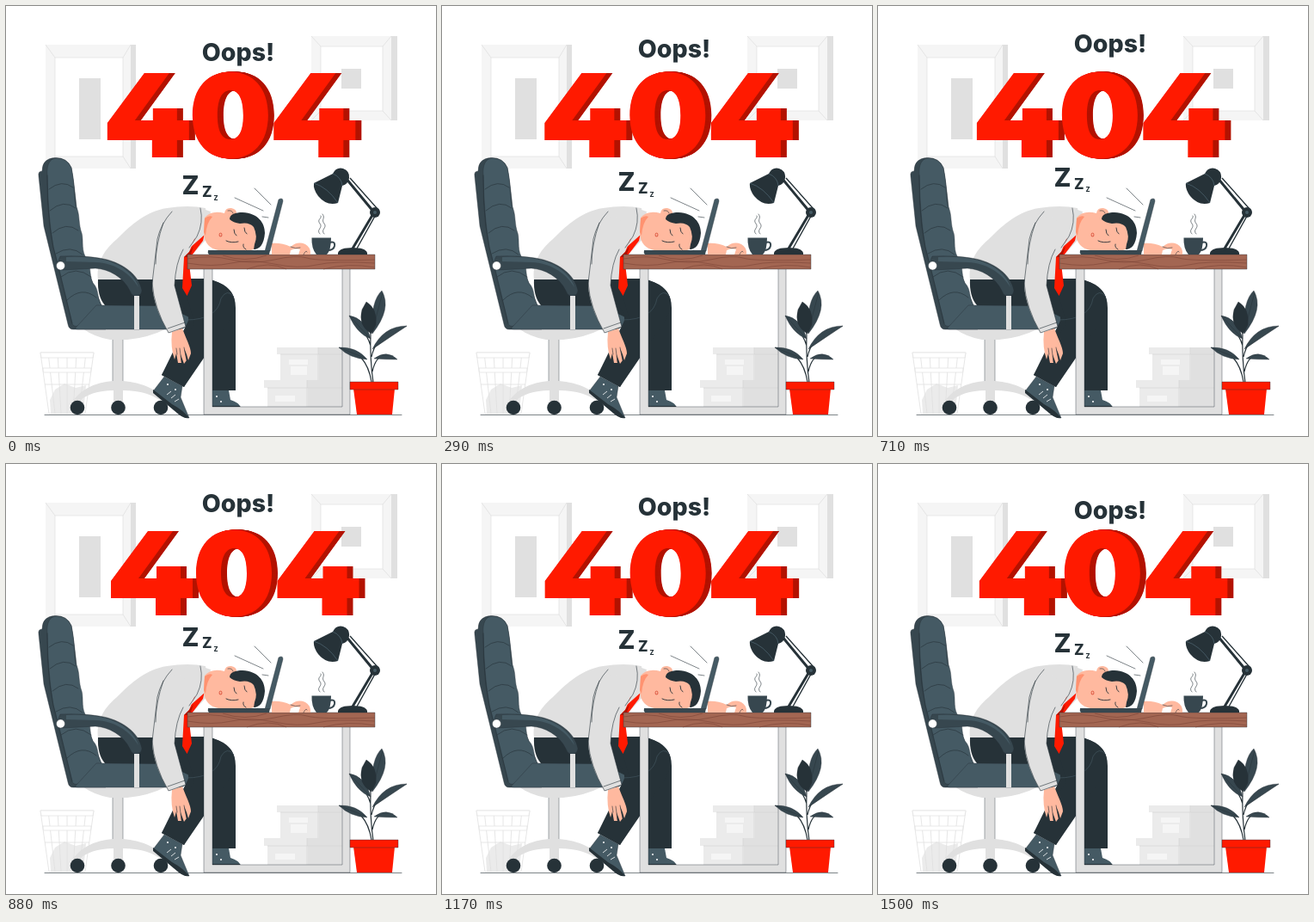
An HTML page for the animation above (1540 ms loop, 500 px wide and 500 px high).

```html
<!DOCTYPE html>
<html lang="en">
<head>
<meta charset="utf-8">
<title>404</title>
<style>
  html, body { margin: 0; width: 100%; height: 100%; overflow: hidden; background: #fff; }
  svg { display: block; width: 100vw; height: 100vh; }
  text { font-family: Inter, "Open Sans", sans-serif; font-weight: 800; fill: #263238; }
  .ink { fill: #263238; }
  .slate { fill: #37474f; }
  .steel { fill: #455a64; }
  .pale { fill: #f5f5f5; }
  .mist { fill: #ebebeb; }
  .grey { fill: #e0e0e0; }
  .skin { fill: #ffb99f; }
  .red { fill: #ff1a00; }
  .deep { fill: #b31200; }
  .line { fill: none; stroke: #263238; stroke-width: .6; stroke-linecap: round; stroke-linejoin: round; }
  .soft { fill: none; stroke: #e0e0e0; stroke-width: .8; }
  .edge { stroke: #263238; stroke-width: .4; stroke-linejoin: round; }
</style>
</head>
<body>
<svg viewBox="0 0 500 500">
  <defs>
    <path id="four" d="M118 156V136L161 78H190L150 133H171V119H199V133H213V156H199V176H170V156Z"/>
    <path id="zero" fill-rule="evenodd" d="M217 127C217 95 235 76.500 261 76.500S305 95 305 127 287 177.500 261 177.500 217 159 217 127ZM246 127C246 147 252 155 261 155S276 147 276 127 270 98 261 98 246 107 246 127Z"/>
  </defs>

  <g id="frames">
    <path class="grey" d="M145 45H151V189H145Z"/>
    <path class="pale" d="M46 45H145V189H46Z"/>
    <path fill="#fff" stroke="#e0e0e0" stroke-width=".7" d="M57 60H136V175H57Z"/>
    <path class="soft" d="M46 45L57 60M145 45L136 60M46 189L57 175M145 189L136 175"/>
    <path class="grey" d="M85 84H110V155H85Z"/>
    <path class="grey" d="M448 35H455V133H448Z"/>
    <path class="pale" d="M355 35H448V133H355Z"/>
    <path fill="#fff" stroke="#e0e0e0" stroke-width=".7" d="M366 47H438V122H366Z"/>
    <path class="soft" d="M355 35L366 47M448 35L438 47M355 133L366 122M448 133L438 122"/>
    <path class="grey" d="M390 73H413V96H390Z"/>
  </g>

  <g id="basket">
    <path class="mist" d="M57 446L68 439 81 444 93 441 90 474H52L51 458Z"/>
    <path class="soft" d="M40 403H102L92 474H50ZM49 403L57 474M60 403L64 474M71 403V474M82 403L78 474M93 403L85 474M43 422H99M45 440H97"/>
    <path fill="#fff" stroke="#e0e0e0" stroke-width=".7" d="M40 403H102L101 409H41ZM43 421H99L98.500 426H43.500Z"/>
  </g>

  <g id="boxes">
    <path class="mist" d="M319 404H364V435H319ZM304 443H351V467H304Z"/>
    <path class="grey" d="M364 404H391V435H364ZM351 443H391V467H351Z"/>
    <path class="mist" d="M315 397H391V405H315ZM300 435H391V444H300Z"/>
    <path class="grey" d="M363 397H391V405H363ZM350 435H391V444H350Z"/>
    <path class="pale" d="M329 411H351V417H329ZM331 419H350V429H331ZM313 453H336V460H313Z"/>
    <path fill="none" stroke="#d4d4d4" stroke-width=".7" d="M319 405H391M304 444H391M363 397V435M350 435V467"/>
  </g>

  <path class="line" d="M45 475.500H460"/>

  <g id="chair">
    <path class="grey edge" d="M124 386H136V440H124Z"/>
    <path class="grey" d="M78 459Q92 439 124 436H136Q170 439 187 459L182 461Q166 447 136 447V463H125V447Q98 447 83 461Z"/>
    <path class="grey" d="M89 375H187Q165 386 141 388H121Q103 385 89 375Z"/>
    <circle class="ink" cx="83" cy="467" r="8.300"/>
    <circle class="ink" cx="130.500" cy="467" r="8.300"/>
    <circle class="ink" cx="180" cy="467" r="8.300"/>
    <path class="slate edge" d="M38 198Q37 192 42 192 42 177 57 176.500 71 176 76 188C82 222 83 251 88 289L110 346 116 376H78Q73 376 72 370L44 256Z"/>
    <path class="steel edge" d="M48 197C47 184 51 177 59 177Q71 177 76 188C80 207 79 220 81 232 86 241 84 249 87 261 91 270 87 281 92 291 100 300 96 312 101 322 109 330 105 340 112 349L84 372Q77 374 76 366L55 281Q49 246 48 197Z"/>
    <path class="line" d="M50 213Q65 201 78 211M51 238Q67 224 81 235M54 264Q70 250 84 261M58 288Q75 277 89 289M64 315Q81 301 99 315M71 342Q88 325 105 339M48 197Q47 260 61 303L77 369"/>
    <path class="steel edge" d="M83 372L105 348H200Q213 350 213 362 212 376 200 376H84Q78 376 83 372Z"/>
  </g>

  <g id="legs">
    <path class="ink" d="M190 319H240Q267 326 267 351V447H240V375L180 346Z"/>
    <path class="steel" d="M240 447H259L261 458Q271 461 273 467H240Z"/>
    <path class="ink" d="M240 465H272L273 467H240Z"/>
    <path class="ink" d="M107 317H207Q252 319 252 341C252 365 221 415 207 443L181 429 212 366Q213 350 199 349L115 348Q106 338 107 317Z"/>
    <path class="ink" d="M205 317H235Q266 326 266 346 266 359 250 380L207 443 181 429 219 369Z"/>
    <path d="M209 365Q246 365 250 340 257 328 265 338" fill="none" stroke="#455a64" stroke-width=".6"/>
    <path class="steel edge" d="M184 431L205 442 203 455Q208 467 213 479L207 478 171 448Z"/>
    <path class="ink" d="M171 446L193 463Q206 470 213 479 207 480 201 475L171 450Z"/>
    <path stroke="#fff" stroke-width=".8" d="M187 452l5-4M192 456l5-4M196 460l5-3"/>
    <circle fill="#fff" cx="188" cy="440" r="1"/><circle fill="#fff" cx="197" cy="446" r="1"/>
    <circle fill="#fff" cx="245" cy="454" r="1"/><circle fill="#fff" cx="250" cy="460" r="1"/>
  </g>

  <g id="body">
    <path class="grey" d="M107 318C105 302 111 286 129 271 147 253 163 239 187 235Q212 231 232 235L236 268 214 292 208 318Z"/>
    <path class="red" d="M219 271L231 264 229 273 216 290 212 291 216 325 210.500 337 205 328 207 292 213 286Z"/>
    <path class="deep" d="M213 286L218 279 214 292H207Z"/>
    <path class="grey" d="M226 235L238 239 232 265 214 281Q229 257 226 235Z"/>
    <path class="line" d="M226 235Q230 252 222 268L213 281"/>
    <path class="skin" d="M193 379L205 375C209 386 215 397 215 404L212 412 210 405 207 398 210 412 207 416 203 405 204 415 200 415 198 404 196 411Q191 397 193 379Z"/>
    <path class="line" d="M207 397L210 412M202 398L204 414M198 398L199 405"/>
    <path class="grey" d="M183 250C193 240 215 247 216 264L206 283Q197 299 196 325L209 373 189 380Q172 351 170 326 172 283 183 250Z"/>
    <path class="line" d="M193 239Q180 253 176 271L170 322Q172 351 189 380L209 373 196 325Q197 299 206 283M183 252Q174 278 174 300M188 375L208 368"/>
  </g>

  <g id="armrest">
    <path class="slate edge" d="M63 291Q90 290 108 293C135 297 155 313 158 331Q157 338 150 337 146 337 144 331C136 315 120 306 104 305L66 307Q57 303 63 291Z"/>
    <path class="steel" d="M70 292Q92 291 108 294C133 298 150 313 154 327 143 309 125 299 105 298L70 297Z"/>
    <path class="grey" d="M149 337H155V376H149Z"/>
    <circle cx="63.500" cy="302" r="5" fill="#fff" class="edge"/>
  </g>

  <g id="desk">
    <path class="grey edge" fill-rule="evenodd" d="M230 304H400V475H230ZM240 304V466H391V304Z"/>
    <path fill="#a36652" class="edge" d="M211 289H429V306H211Z"/>
    <path fill="none" stroke="#7c4638" stroke-width=".6" d="M211 294Q238 289 262 295T312 295 350 293 429 295M211 299Q240 304 262 299T312 300 361 301 429 299M280 306Q306 296 326 306M252 290Q278 299 303 290M369 306Q398 298 429 304"/>
  </g>

  <g id="head">
    <path class="skin" d="M231 246Q239 237 254 241 255 234 262 235 269 236 268 243 292 246 298 262 299 280 285 284H247Q231 281 230 264Z"/>
    <path fill="#ff9270" d="M231 247Q236 243 240 245 233 252 232 267L230 263Z"/>
    <path class="ink" d="M260 248C260 242 267 240 275 240 293 241 301 252 301 264 300 277 295 283 288 283L289 277Q293 268 288 257 283 251 272 253 264 252 260 248Z"/>
    <path class="line" d="M258 238Q263 237 264 241"/>
    <path class="line" style="stroke-width:.9" d="M265 260Q265 265 268 267M277 258Q277 263 280 265M276 277Q275 281 279 283M256 273Q262 276 270 274"/>
    <ellipse cx="249.500" cy="266" rx="2" ry="2.600" fill="#e0604a"/>
    <ellipse cx="249.500" cy="266" rx=".9" ry="1.400" fill="#ffb99f"/>
  </g>

  <g id="laptop">
    <path class="skin" d="M309 276Q320 275 331 280 339 273 348 277 355 281 354 289H309Z"/>
    <path fill="#fff" d="M331 284Q336 281 342 283L340 289H330Z"/>
    <path class="line" d="M331 280Q337 283 342 281M346 289Q349 283 350 286"/>
    <path class="steel edge" d="M317 225Q322 222 322 227L307 285H301Z"/>
    <path class="slate" d="M235 284H307L306 289H236Q234 287 235 284Z"/>
    <path class="line" d="M266 223L299 238M289 212L308 231M298 245L305 246"/>
  </g>

  <g id="cup">
    <path d="M376 275Q383 273 382 279 381 284 374 284" fill="none" stroke="#37474f" stroke-width="2"/>
    <path class="slate" d="M355.500 269.500H378Q378 284 373 289H361Q355 282 355.500 269.500Z"/>
    <path class="line" d="M365 265c-5-5 4-7 0-12s3-6 1-9M370 265c-5-5 4-7 0-12s2-6-2-11"/>
  </g>

  <g id="lamp">
    <path class="ink" d="M386 287Q388 281 403 281 418 281 420 287V289H386Z"/>
    <path fill="none" stroke="#263238" stroke-width="3" d="M395 200L428 240 403 282"/>
    <path fill="none" stroke="#263238" stroke-width="1.400" d="M400 200L433 237 408 282"/>
    <circle class="ink" cx="429" cy="240" r="6"/><circle class="steel" cx="429" cy="240" r="2"/>
    <path class="ink" d="M358 206L380 195Q384 187 392 189 400 192 399 200 398 207 391 209L386 229Q373 233 363 221 357 213 358 206Z"/>
    <path fill="none" stroke="#607d8b" stroke-width=".5" d="M380 195Q390 199 391 209M358 206Q374 211 386 229"/>
  </g>

  <g id="plant">
    <path fill="none" stroke="#263238" stroke-width="1.200" d="M427 438Q423 411 424 378M425 437Q422 419 413 409M425 408Q429 389 445 380M426 425Q430 407 441 406M424 395Q420 382 412 375"/>
    <g class="slate edge">
      <path d="M399 360Q418 363 424 387 408 381 399 360Z"/>
      <path d="M426 378Q424 343 437 331 449 352 426 381Z"/>
      <path class="ink" d="M419 344Q432 352 430 371L425 381Q409 372 414 353Z"/>
      <path d="M426 399Q439 372 466 372 449 383 426 399Z"/>
      <path d="M387 397Q408 396 420 411 400 410 387 397Z"/>
      <path d="M428 410Q443 399 455 411 441 411 428 410Z"/>
    </g>
    <path fill="none" stroke="#263238" stroke-width=".5" d="M399 360L423 386M438 333L426 378M466 372L427 398M387 397L419 410"/>
    <path class="red" d="M404 445H452L449 475H408Z"/>
    <path class="red edge" d="M400 437H456V446H400Z"/>
  </g>

  <g id="code" aria-label="404"></g>

  <g id="oops"><text x="270" y="64" font-size="28.500" text-anchor="middle">Oops!</text></g>
  <g id="snore">
    <text x="204.500" y="219.500" font-size="29.500">Z</text>
    <text x="228" y="222.300" font-size="17">Z</text>
    <text x="241.500" y="226" font-size="7.500">Z</text>
  </g>
</svg>
<script>
  const $ = id => document.getElementById(id);
  const DEPTH = 7, LOOP = 1540, CYCLE = 1500, STEP = 1000 / 24, LEAD = 25;

  // Extruded digits: dark copies swept to the right, bright face on top.
  const copy = (shape, x, tone) => `<use href="#${shape}" x="${x}" class="${tone}"/>`;
  const digit = (shape, x) => {
    let out = '';
    for (let d = DEPTH; d > 0; d -= .5) out += copy(shape, x + d, 'deep');
    return out + copy(shape, x, 'red');
  };
  $('code').innerHTML = digit('four', 0) + digit('zero', 0) + digit('four', 193.5);

  // Sideways shake, one value per tenth of the cycle.
  const SHAKE = [0, -1, 2, -4, 4, -4, 4, -4, 2, -1, 0];
  const shake = p => {
    const i = Math.floor(p * 10), f = p * 10 - i;
    return SHAKE[i] + (SHAKE[i + 1] - SHAKE[i]) * f;
  };
  const float = p => -10 * (1 - Math.abs(2 * p - 1));
  const shift = (id, x, y) => $(id).setAttribute('transform', `translate(${x} ${y})`);

  const start = performance.now();
  function draw(now) {
    const t = Math.max(0, now - start) % LOOP;
    const step = Math.min(36, Math.floor((t + 5) / STEP));
    const p = (step * STEP + LEAD) % CYCLE / CYCLE;
    shift('code', shake(p), 0);
    shift('oops', 0, float(p));
    shift('snore', 0, float(p));
    requestAnimationFrame(draw);
  }
  draw(start);
</script>
</body>
</html>
```
